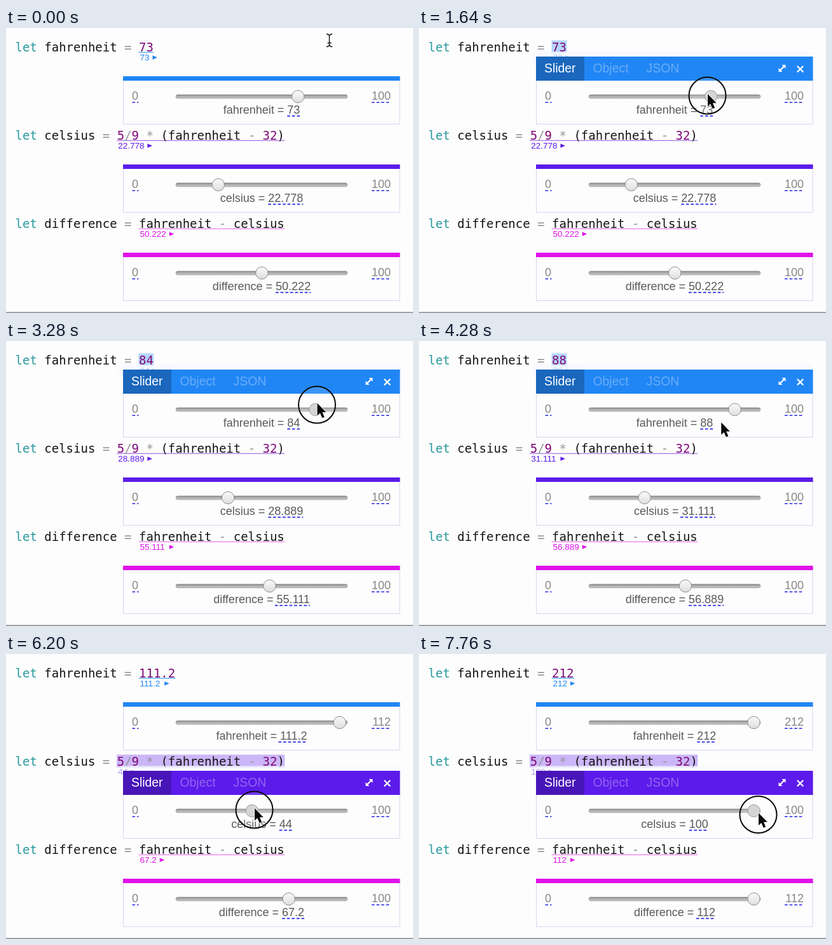
Write an HTML page that moves like this. It is 640 px wide and 449 px high and loops after 8 s.

```html
<!DOCTYPE html>
<html lang="en">
<head>
<meta charset="utf-8">
<title>Linked sliders</title>
<style>
  html, body { margin: 0; width: 100%; height: 100%; overflow: hidden; background: #fdfdfd; }
  svg { display: block; width: 640px; height: 449px; }
  text { white-space: pre; }
  .code { font: 19px "DejaVu Sans Mono", monospace; fill: #151515; }
  .kw { fill: #27989c; }
  .op { fill: #959595; }
  .num { fill: #800a78; }
  .ui { font: 18px "Liberation Sans", Arial, sans-serif; fill: #5a5a5a; }
  .limit { fill: #868686; }
  .result { font: 13.5px "Liberation Sans", Arial, sans-serif; }
  .tab { font: 19.4px "Liberation Sans", Arial, sans-serif; fill: #fff; }
  .dash { stroke: #2525ea; stroke-width: 1.6; stroke-dasharray: 4.6 3; }
</style>
</head>
<body>
<svg viewBox="0 0 640 449">
  <defs>
    <linearGradient id="groove" x2="0" y2="1">
      <stop stop-color="#858585"/><stop offset=".5" stop-color="#b4b4b4"/><stop offset="1" stop-color="#c2c2c2"/>
    </linearGradient>
    <linearGradient id="knob" x2="0" y2="1">
      <stop stop-color="#fafafa"/><stop offset="1" stop-color="#dedede"/>
    </linearGradient>
  </defs>
  <g id="scene"></g>
</svg>
<script>
const LOOP = 8000, STEP = 40, CHAR = 11.44, LEFT = 14.5, ROW = 139;
const scene = document.getElementById('scene');

const ease = {
  lin: p => p,
  in: p => p ** 1.5,
  out: p => 1 - (1 - p) ** 1.5,
  both: p => p * p * (3 - 2 * p)
};

// Each key: time, value(s), then the easing that leads to it.
const pointer = [
  [0, [508.5, 19.5]], [40, [508.5, 19.5]], [840, [462, 105], 'both'], [920, [463, 105]],
  [1520, [463, 105]], [1640, [454, 104], 'in'], [2200, [399.5, 107], 'out'],
  [2400, [399.5, 107]], [3120, [487, 101], 'both'], [3240, [487, 101]],
  [3280, [489.5, 98]], [3480, [500, 99], 'out'], [4040, [500, 99]],
  [4880, [375, 246], 'both'], [5000, [367, 245]], [5400, [357, 245], 'out'],
  [5720, [357, 245]], [6200, [391, 243], 'in'], [7360, [532, 251.5], 'out'],
  [7720, [532, 251.5]], [7760, [534, 250.5]]
];
const fahrenheitKeys = [
  [1640, [73]], [2200, [49], 'out'], [2400, [49]], [3120, [84], 'both'],
  [3280, [84]], [3480, [88], 'out']
];
const celsiusKeys = [[5720, [280 / 9]], [6200, [44], 'in'], [7360, [100], 'out']];

const rows = [
  { name: 'fahrenheit', color: '#2186f5', dark: '#1a67bd', line: '#55a8f8', mark: '#b5d5fb', open: 440, close: 4320 },
  { name: 'celsius', color: '#5c1bea', dark: '#4816b8', line: '#a878e8', mark: '#cbb6f8', open: 4480, close: Infinity },
  { name: 'difference', color: '#e012ea', dark: '#b010b8', line: '#ee80ee', mark: '#f5b8f8', open: Infinity, close: Infinity }
];

function at(keys, t) {
  const i = keys.findIndex(k => k[0] > t);
  if (i === 0) return keys[0][1];
  if (i < 0) return keys[keys.length - 1][1];
  const [t0, a] = keys[i - 1], [t1, b, kind = 'lin'] = keys[i];
  const p = ease[kind]((t - t0) / (t1 - t0));
  return a.map((v, n) => v + (b[n] - v) * p);
}

const clamp = v => Math.max(0, Math.min(1, v));
const format = v => String(+v.toFixed(3));
const width = (s, size) => [...s].reduce((w, c) => w + (c === '.' ? .278 : .556) * size, 0);
const text = (x, y, cls, s, more = '') => `<text x="${x}" y="${y}" class="${cls}" ${more}>${s}</text>`;
const rect = (x, y, w, h, fill, more = '') =>
  `<rect x="${x}" y="${y}" width="${w}" height="${h}" fill="${fill}" ${more}/>`;
const dashes = (x, y, w) => `<path class="dash" d="M${x} ${y}h${w}"/>`;

function paint(code) {
  return code.replace(/let\b|[a-z]+|[\d.]+|[=*\/-]/g, s => {
    const cls = s === 'let' ? 'kw' : /\d/.test(s) ? 'num' : /[a-z]/.test(s) ? '' : 'op';
    return cls ? `<tspan class="${cls}">${s}</tspan>` : s;
  });
}

function popup(row, k) {
  const top = 76 - 31 * k, h = 83 - top;
  return rect(177, top - 8, 444, 20, '#f7f8fd', `rx="8" opacity="${.6 * k}"`) +
    rect(184, top, 435.5, h, row.color) +
    `<g opacity="${k}">` + rect(184, top, 76, h, row.dark) +
    text(197, 70, 'tab', 'Slider') +
    text(273.5, 70, 'tab', 'Object', 'opacity=".32"') +
    text(357.5, 70, 'tab', 'JSON', 'opacity=".32"') +
    `<path d="M567.5 67l7-7M594.8 60l9.4 9.4m0-9.4l-9.4 9.4" stroke="#fff" stroke-width="2.3"/>
     <path d="M565.5 69v-6l6 6zM576.5 58v6l-6-6z" fill="#fff"/></g>`;
}

function drawRow(row, i, value, source, t, pressed) {
  const shown = format(value), max = Math.max(100, Math.ceil(value - 1e-6));
  const k = clamp((t - row.open) / 200) * (1 - clamp((t - row.close) / 200));
  const lead = `let ${row.name} = `, x = LEFT + lead.length * CHAR, w = source.length * CHAR;
  const rx = x + 1.5, tip = rx + width(shown, 13.5) + 5;
  const knob = 277 + 249.5 * value / max;
  const label = `${row.name} = `, vw = width(shown, 18);

  let out = k > 0 ? rect(x - .5, 19.5, w + 1, 20, row.mark, `opacity="${k}"`) : '';
  if (k < 1) out += rect(x - .5, 37.7, w + 1, 1.3, row.line, `opacity="${1 - k}"`);
  out += text(LEFT, 37, 'code', paint(lead + source)) +
    text(rx, 50.5, 'result', shown, `fill="${row.color}"`) +
    `<path d="M${tip} 43.2l7.5 3.3l-7.5 3.3z" fill="${row.color}"/>` +
    rect(184.5, 80, 434.5, 71.5, '#fdfdfe', 'stroke="#d6d6ee"') +
    popup(row, k) +
    text(198, 113, 'ui limit', 0) + dashes(198.5, 117.3, 10) +
    text(605, 113, 'ui limit', max, 'text-anchor="end"') + dashes(575, 117.3, 30) +
    rect(267, 105, 270, 6, 'url(#groove)', 'rx="3" stroke="#999" stroke-width=".6"') +
    `<circle cx="${knob}" cy="108" r="9.7" fill="${pressed ? '#cfcfcf' : 'url(#knob)'}" stroke="#8c8c8c"/>` +
    text(402, 135, 'ui', label + shown, 'text-anchor="middle" data-value') +
    `<g class="under" data-w="${vw}">${dashes(0, 138.6, vw)}</g>`;
  return `<g transform="translate(0 ${i * ROW})">${out}</g>`;
}

function drawPointer([x, y], ring, beam) {
  if (beam) {
    const d = 'M-4.7-10q4.7 0 4.7 4v12q0 4-4.7 4M4.7-10q-4.7 0-4.7 4v12q0 4 4.7 4M-3 4h6';
    return `<g transform="translate(${x} ${y})" fill="none">
      <path d="${d}" stroke="#fff" stroke-width="3"/><path d="${d}" stroke="#111" stroke-width="1.4"/></g>`;
  }
  return `<g transform="translate(${x} ${y})">` +
    (ring ? '<circle cx="-.5" cy="2.5" r="29" fill="#fff" fill-opacity=".12" stroke="#0a0a0a" stroke-width="2"/>' : '') +
    `<path d="M0 0v19.5l4.3-4l3.4 7.7l3.5-1.5l-3.3-7.4h5.9z" fill="#080808" stroke="#fff"
      stroke-width="1.6" paint-order="stroke"/></g>`;
}

function render(t) {
  const dragF = t >= 1520 && t < 4080, dragC = t >= 5760;
  let f, c;
  if (dragC) {
    c = Math.round(at(celsiusKeys, t)[0]);
    f = c * 9 / 5 + 32;
  } else {
    f = Math.round(at(fahrenheitKeys, t)[0]);
    c = (f - 32) * 5 / 9;
  }
  const pos = at(pointer, t), y = pos[1];
  const beam = y < (t < 2000 ? 68 : 0) || (y > 152 && y < 184);
  const sources = [format(f), '5/9 * (fahrenheit - 32)', 'fahrenheit - celsius'];
  const values = [f, c, f - c];

  scene.innerHTML = rect(0, 447.5, 640, 1.3, '#777') +
    rows.map((row, i) => drawRow(row, i, values[i], sources[i], t, [dragF, dragC][i])).join('') +
    drawPointer(pos, dragF || dragC, beam);

  // Right-align each dashed rule with its centred caption.
  const captions = scene.querySelectorAll('[data-value]');
  scene.querySelectorAll('.under').forEach((g, i) => {
    const end = 402 + captions[i].getComputedTextLength() / 2;
    g.setAttribute('transform', `translate(${end - g.dataset.w} 0)`);
  });
}

const start = performance.now();
let last = -1;
function tick() {
  const t = Math.floor((performance.now() - start) % LOOP / STEP) * STEP;
  if (t !== last) render(last = t);
  requestAnimationFrame(tick);
}
tick();
</script>
</body>
</html>
```
